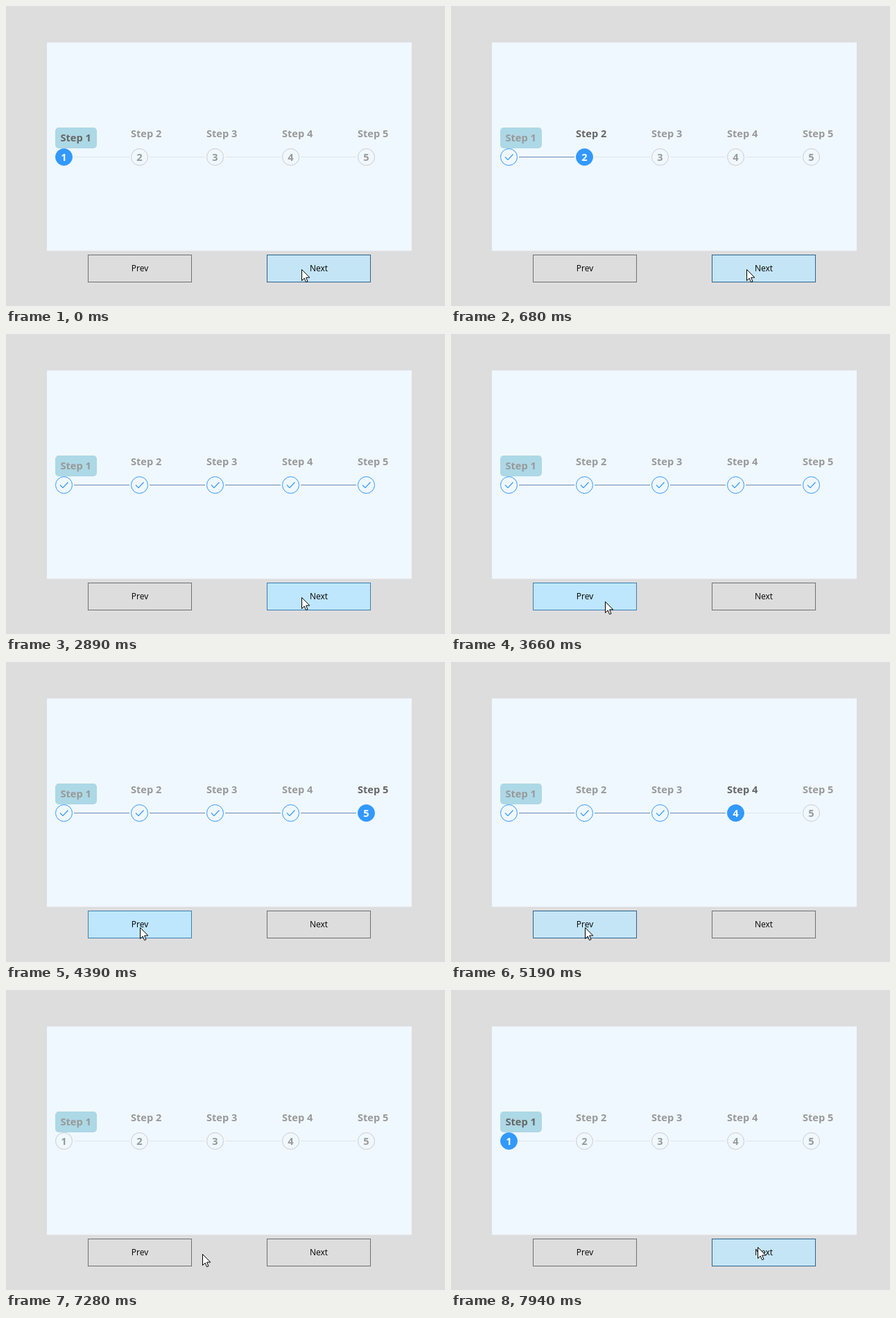
Recreate the animation shown at these times as an HTML page. Size 633 px wide and 432 px high, loop 8000 ms.

```html
<!DOCTYPE html>
<html lang="en">
<head>
<meta charset="utf-8">
<title>Step bar</title>
<style>
  html, body { margin: 0; width: 100%; height: 100%; overflow: hidden; background: #ddd; }
  svg { display: block; width: 633px; height: 432px; }
  text { font-family: "Open Sans", "Noto Sans", sans-serif; }
  .step text { font-size: 14.6px; font-weight: 700; fill: #999; }
  .number, .button text { text-anchor: middle; }
  .ring { fill: none; stroke: #c8ccd1; }
  .check { fill: none; stroke: #39f; stroke-width: 1.2; visibility: hidden; }
  .line { stroke: #dfe6ed; }
  .active .ring { fill: #39f; stroke: #39f; }
  .step.active .title { fill: #666; }
  .step.active .number { fill: #fff; }
  .done .ring { stroke: #39f; }
  .done .check { visibility: visible; }
  .done .number { visibility: hidden; }
  .done .line { stroke: #6a8cb0; }
  .button rect { fill: #ddd; stroke: #707070; }
  .button text { font-size: 12px; fill: #000; }
  .button.hover rect { fill: #bee6fd; stroke: #3c7fb1; }
  .button.pressed rect { fill: #c4e5f6; stroke: #2c628b; }
</style>
</head>
<body>
<svg viewBox="0 0 633 432">
  <rect width="633" height="432" fill="#ddd"/>
  <rect x="59" y="52.5" width="526" height="300" fill="#f0f8ff"/>
  <rect x="71" y="175" width="60" height="30" rx="5" fill="#add8e6"/>
  <g id="steps"></g>
  <g id="buttons"></g>
  <path id="cursor" d="M.5 .5V16.5L4.2 13L6.6 18.6L9 17.6L6.6 12H11.8Z" fill="#fff" stroke="#000"/>
</svg>
<script>
const LOOP = 8000;
const PREV = 0, NEXT = 1;

// [press time, release time, button, step after release]
const clicks = [
  [0, 150, NEXT, 2], [680, 830, NEXT, 3], [1360, 1510, NEXT, 4],
  [2040, 2180, NEXT, 5], [2740, 2890, NEXT, 6],
  [4240, 4390, PREV, 5], [4790, 4920, PREV, 4], [5190, 5470, PREV, 3],
  [5610, 5860, PREV, 2], [6140, 6260, PREV, 1], [6560, 6690, PREV, 0],
  [7520, 7820, NEXT, 1], [7940, 8000, NEXT, 2]
];

// [time, x, y]
const moves = [
  [0, 426, 379], [3420, 372, 384], [3540, 284, 386], [3660, 222, 385],
  [3810, 193, 382], [7280, 283, 380], [7400, 442, 370]
];

const buttonX = [118, 376];
const byId = id => document.getElementById(id);

byId("steps").innerHTML = [1, 2, 3, 4, 5].map(n => {
  const first = n === 1;
  const line = n < 5 ? '<path class="line" d="M27 217.5H107"/>' : "";
  return `<g class="step" transform="translate(${71 + 109 * (n - 1)})">
    <text class="title" x="${first ? 7.5 : 0}" y="${first ? 195 : 189}">Step ${n}</text>
    ${line}
    <circle class="ring" cx="12.5" cy="217.5" r="12"/>
    <path class="check" d="M7 217.5L11 221.5L18.5 213.5"/>
    <text class="number" x="12.5" y="223">${n}</text>
  </g>`;
}).join("");

byId("buttons").innerHTML = ["Prev", "Next"].map((label, i) =>
  `<g class="button" transform="translate(${buttonX[i]} 358)">
    <rect x=".5" y=".5" width="149" height="39"/>
    <text x="75" y="24">${label}</text>
  </g>`).join("");

const steps = [...document.querySelectorAll(".step")];
const buttons = [...document.querySelectorAll(".button")];
const cursor = byId("cursor");

function draw(t) {
  const released = clicks.filter(c => c[1] <= t).pop();
  const current = released ? released[3] : 1;
  const held = clicks.find(c => c[0] <= t && t < c[1]);
  const [, x, y] = moves.filter(m => m[0] <= t).pop();

  steps.forEach((el, i) => {
    const state = i + 1 < current ? " done" : i + 1 === current ? " active" : "";
    el.setAttribute("class", "step" + state);
  });
  buttons.forEach((el, i) => {
    const over = x >= buttonX[i] && x < buttonX[i] + 150;
    const state = held && held[2] === i ? " pressed" : over ? " hover" : "";
    el.setAttribute("class", "button" + state);
  });
  cursor.setAttribute("transform", `translate(${x} ${y})`);
}

const start = performance.now();
function tick() {
  draw((performance.now() - start) % LOOP);
  requestAnimationFrame(tick);
}
tick();
</script>
</body>
</html>
```
